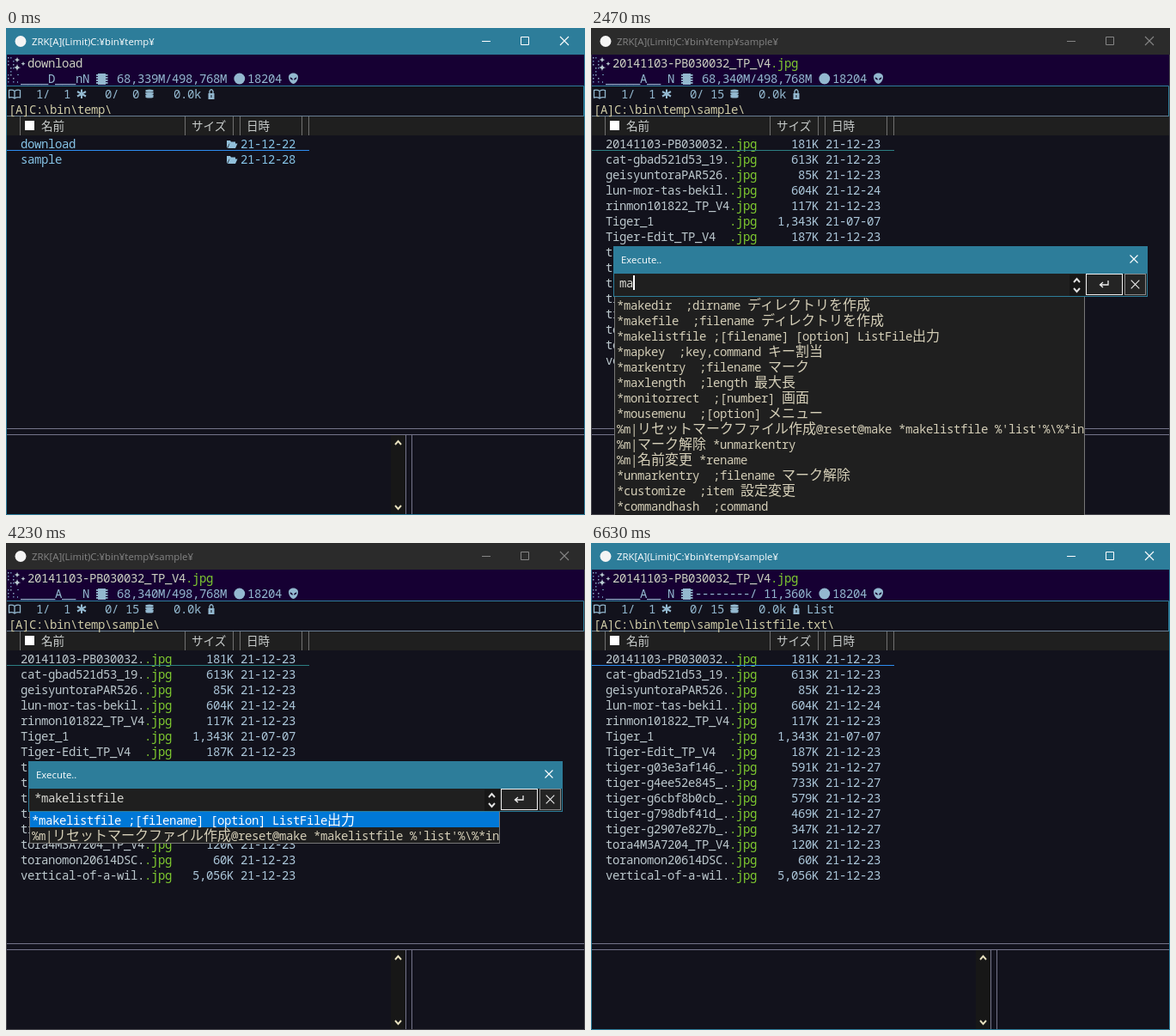
These frames come from a looping animation (674 px wide and 567 px high, 8 s). An HTML page:

```html
<!DOCTYPE html>
<html lang="ja">
<head>
<meta charset="utf-8">
<title>File list</title>
<style>
  html, body { margin: 0; width: 100%; height: 100%; overflow: hidden; background: #12121c; }
  svg { display: block; width: 674px; height: 567px; }
  text { font: 500 14px "Noto Sans Mono", "Noto Sans CJK JP", monospace; letter-spacing: -.4px; white-space: pre; }
  .ui { font: 11.4px "Open Sans", "Noto Sans", sans-serif; letter-spacing: 0; }
  .head { font: 13.6px "Noto Sans CJK JP", "Noto Sans CJK", sans-serif; letter-spacing: 0; }
  .wide { font: 16px "Noto Sans CJK JP", "Noto Sans CJK", sans-serif; letter-spacing: 0; }
</style>
</head>
<body>
<svg id="stage" viewBox="0 0 674 567"></svg>
<script>
const LOOP = 8000;
const TEAL = '#2d7d9a', INFO = '#93b8cf', NAME = '#bcc8cd', GREEN = '#80cc30', LINE = '#74748a', PANEL = '#1f1f1f';

const photos = [
  ['20141103-PB030032.', '181K', '12-23'],
  ['cat-gbad521d53_19.', '613K', '12-23'],
  ['geisyuntoraPAR526.', '85K', '12-23'],
  ['lun-mor-tas-bekil.', '604K', '12-24'],
  ['rinmon101822_TP_V4', '117K', '12-23'],
  ['Tiger_1', '1,343K', '07-07'],
  ['Tiger-Edit_TP_V4', '187K', '12-23'],
  ['tiger-g03e3af146_.', '591K', '12-27'],
  ['tiger-g4ee52e845_.', '733K', '12-27'],
  ['tiger-g6cbf8b0cb_.', '579K', '12-23'],
  ['tiger-g798dbf41d_.', '469K', '12-27'],
  ['tiger-g2907e827b_.', '347K', '12-27'],
  ['tora4M3A7204_TP_V4', '120K', '12-23'],
  ['toranomon20614DSC.', '60K', '12-23'],
  ['vertical-of-a-wil.', '5,056K', '12-23'],
].map(([name, size, day]) => ({ name, ext: '.jpg', size, date: '21-' + day }));
const folders = [['download', '22'], ['sample', '28']]
  .map(([name, day]) => ({ name, folder: true, date: '21-12-' + day }));
const listFile = { name: 'listfile', ext: '.txt', size: '7.1K', date: '21-12-28', marked: true };

const makeList = '*makelistfile ;[filename] [option] ListFile出力';
const makeMenu = "%m|リセットマークファイル作成@reset@make *makelistfile %'list'%\\%*in";
const makeItems = ['*makedir  ;dirname ディレクトリを作成', '*makefile  ;filename ディレクトリを作成', makeList, makeMenu];
const allItems = [...makeItems.slice(0, 3), '*mapkey  ;key,command キー割当', '*markentry  ;filename マーク',
  '*maxlength  ;length 最大長', '*monitorrect  ;[number] 画面', '*mousemenu  ;[option] メニュー', makeMenu,
  '%m|マーク解除 *unmarkentry', '%m|名前変更 *rename', '*unmarkentry  ;filename マーク解除',
  '*customize  ;item 設定変更', '*commandhash  ;command', '*closemenu'];

// Each step changes only the listed parts of the state before it.
const steps = [
  [0, { rows: folders, cursor: 0, attr: '____D___nN', disk: ' 68,339M/498,768M', total: ' 0', note: '', path: 'temp\\', title: 'temp¥' }],
  [500, { cursor: 1 }],
  [840, { rows: photos, cursor: 0, attr: '_____A__ N', disk: ' 68,340M/498,768M', total: '15', path: 'temp\\sample\\', title: 'temp¥sample¥' }],
  [1700, { dialog: true, typed: '', items: [] }],
  [2250, { typed: 'm' }],
  [2360, { items: allItems }],
  [2470, { typed: 'ma' }],
  [2710, { typed: 'mak', items: makeItems }],
  [2810, { typed: 'make' }],
  [3030, { typed: 'makel', items: [makeList, makeMenu] }],
  [3570, { picked: true }],
  [3700, { typed: '*makelistfile' }],
  [4230, { caretOff: true }],
  [4450, { dialog: false, rows: [...photos, listFile], disk: ' 68,342M/498,768M', total: '16' }],
  [5440, { attr: '_____A__ G' }],
  [6090, { cursor: 15 }],
  [6630, { cursor: 0, rows: photos, attr: '_____A__ N', disk: '--------/ 11,360k', total: '15', note: 'List', path: 'temp\\sample\\listfile.txt\\' }],
];
let merged = {};
const states = steps.map(([at, change]) => ({ at, ...(merged = { ...merged, ...change }) }));

const rect = (x, y, w, h, fill, extra = '') => `<rect x="${x}" y="${y}" width="${w}" height="${h}" fill="${fill}" ${extra}/>`;
const frame = (x, y, w, h, fill, stroke) => rect(x + .5, y + .5, w - 1, h - 1, fill, `stroke="${stroke}"`);
const text = (x, y, str, fill, extra = '') => `<text x="${x}" y="${y}" fill="${fill}" ${extra}>${str}</text>`;
const path = (d, stroke, width = 1) => `<path d="${d}" fill="none" stroke="${stroke}" stroke-width="${width}"/>`;
const solid = (d, fill) => `<path d="${d}" fill="${fill}"/>`;
const cross = (x, y, r, color) => path(`M${x - r} ${y - r}l${2 * r} ${2 * r}m0 ${-2 * r}l${-2 * r} ${2 * r}`, color, 1.1);
const chevron = (x, y, dir, color) => path(`M${x - 3.5} ${y + 2 * dir}l3.5 ${-4 * dir}l3.5 ${4 * dir}`, color, 1.9);
const mixed = str => str.replace(/[\u3040-\u30ff\u4e00-\u9fff]+/g, run => `<tspan class="wide">${run}</tspan>`);

function sparkles() {
  let out = '';
  for (let i = 0; i < 24; i++) {
    const x = 2 + (i % 3) * 3, y = 34 + Math.floor(i / 3) * 4;
    if ((i * 7) % 5 < 3) out += rect(x, y, 1.5, 1.5, i % 2 ? '#6688ad' : '#8ba8bd');
  }
  const star = (x, y, r) => solid(`M${x} ${y - r}q.5 ${r} ${r} ${r}q${-r} .5 ${-r} ${r}q-.5 ${-r} ${-r} ${-r}q${r} -.5 ${r} ${-r}`, '#b9ccd0');
  return out + star(13, 37, 3.5) + star(13, 46, 4.5) + star(20, 41.5, 2.5) + rect(13, 54, 2, 1, '#6688ad') + rect(13, 62, 1, 2, '#6688ad');
}

function infoIcons() {
  let out = rect(107, 53, 9, 13, INFO);
  for (let y = 54; y < 66; y += 3) out += rect(105, y, 13.5, 1.8, INFO);
  out += `<circle cx="271.8" cy="59" r="6.4" fill="${INFO}"/>`;
  out += solid('M329 57c0-6 11-6 11 0c0 4-3 8-5.5 8s-5.5-4-5.5-8', INFO);
  out += solid('M330.5 57.5q3 0 3.5 3q-3 0-3.5-3m8 0q-3 0-3.5 3q3 0 3.5-3', '#160033');
  out += path('M3.5 72.5q4-1 6.5 1q3-2 6.5-1v8.5q-3.5-1-6.5 1q-2.5-2-6.5-1zM10 73v9', INFO, 1.3);
  out += path('M88 71.5v10.5m-5-8l10 5.5m0-5.5l-10 5.5', INFO, 2);
  for (let y = 73; y < 83; y += 3.5) out += `<ellipse cx="167" cy="${y}" rx="4.7" ry="1.5" fill="${INFO}"/>`;
  out += rect(162.3, 74.6, 9.4, 1.2, INFO) + rect(162.3, 78, 9.4, 1.2, INFO);
  return out + rect(235.5, 76, 7, 7, INFO) + path('M237 76v-2.5q2-3.5 4 0v2.5', INFO, 1.3) + rect(238.5, 78, 1, 3, '#12121c');
}

function windowBase(s) {
  const active = !s.dialog;
  const ink = active ? '#fff' : '#858585';
  const edge = active ? TEAL : '#46464c';
  return rect(0, 0, 674, 567, '#12121c')
    + rect(0, 0, 674, 31, active ? TEAL : '#2b2b2b')
    + '<circle cx="17" cy="15.5" r="6.5" fill="#f4f4f4"/>'
    + text(30, 20, 'ZRK[A](Limit)C:¥bin¥' + s.title, ink, 'class="ui"')
    + path('M554 15.5h10M599.5 10.5h9v9h-9z', ink) + cross(650, 15, 5, ink)
    + rect(1, 31, 672, 36, '#160033')
    + rect(1, 103, 672, 22, PANEL)
    + path('M1 102.5H673', '#687e93') + path('M1 67.5H672.5V103', TEAL)
    + path('M16.5 103v22M208.5 103v22M264.5 103v22M272.5 103v22M344.5 103v22M352.5 103v22', '#707070')
    + rect(22, 108, 11, 11, '#fff')
    + [[41, '名前'], [216, 'サイズ'], [280, '日時']].map(([x, label]) => text(x, 119, label, '#c8cccb', 'class="head"')).join('')
    + rect(448, 474, 17, 92, '#171717')
    + path('M1 466.5H673M1 473.5H673M465.5 473V566M472.5 473V566', LINE)
    + chevron(456.5, 483, 1, '#e6dfbd') + chevron(456.5, 558, -1, '#e6dfbd')
    + path('M.5 31V566.5H673.5V31', edge);
}

function header(s) {
  const entry = s.rows[s.cursor];
  const full = entry.name === photos[0].name ? '20141103-PB030032_TP_V4' : entry.name;
  const ext = entry.ext ? `<tspan fill="${entry.marked ? '#5f93b5' : GREEN}">${entry.ext}</tspan>` : '';
  return sparkles() + infoIcons()
    + text(25, 46, full + ext, '#cbd0c0')
    + text(17, 64, s.attr, INFO) + text(121, 64, s.disk, INFO) + text(281, 64, '18204', INFO)
    + text(35, 82, '1/  1', INFO) + text(115, 82, '0/ ' + s.total, INFO) + text(195, 82, '0.0k', INFO)
    + text(251, 82, s.note, INFO)
    + text(3, 100, '[A]C:\\bin\\' + s.path, '#cdc9a5');
}

function fileRow(row, i) {
  const y = 140 + 18 * i;
  const ink = row.folder ? '#86c3e6' : NAME;
  let out = row.marked ? rect(1, y - 15, 352, 18, '#28326f') : '';
  out += text(17, y, row.name, ink) + text(273, y, row.date, row.folder ? ink : '#acc7da');
  if (row.folder) return out + solid(`M257 ${y}v-9h4l1 1.5h5v2h-7zM258 ${y}l2.5-5.5h9l-2.5 5.5z`, '#91bfda');
  return out + text(161, y, row.ext, row.marked ? '#5f93b5' : GREEN)
    + text(265, y, row.size, '#acc7da', 'text-anchor="end"');
}

function dialog(s) {
  let out = '';
  const n = s.items.length;
  if (n) {
    out += frame(27, 312, 548, 18 * n + 2, PANEL, '#777');
    if (s.picked) out += rect(28, 313, 546, 18, '#0078d7');
    out += '<g clip-path="url(#menu)">' + s.items.map((item, i) =>
      text(30, 328 + 18 * i, mixed(item), s.picked && !i ? '#fff' : '#d5cfb8')).join('') + '</g>';
  }
  out += frame(26, 254, 622, 59, PANEL, TEAL) + rect(26, 254, 622, 32, TEAL)
    + text(35, 274, 'Execute..', '#fff', 'class="ui"') + cross(632, 269, 4.5, '#fff')
    + rect(557, 287, 17, 25, '#171717')
    + chevron(565.5, 294, 1, '#e2e2e2') + chevron(565.5, 305, -1, '#e2e2e2')
    + frame(576, 286, 43, 25, '#242424', '#f2f2f2') + frame(621, 286, 25, 25, '#242424', '#8c8c8c')
    + path('M602 294v5h-9m3-3l-3.5 3l3.5 3', '#eee', 1.3) + cross(633.5, 298.5, 4.8, '#eee')
    + text(33, 302, s.typed, '#d8d8d2');
  if (!s.caretOff) out += rect(33 + 8 * s.typed.length, 288, 2, 17, '#fff');
  return out;
}

const stage = document.getElementById('stage');
let shown = null;

function draw(time) {
  const s = states.findLast(state => state.at <= time);
  if (s === shown) return;
  shown = s;
  stage.innerHTML = '<clipPath id="menu"><rect x="28" y="313" width="546" height="254"/></clipPath>'
    + windowBase(s) + header(s) + s.rows.map(fileRow).join('')
    + rect(1, 142 + 18 * s.cursor, 352, 1, s.dialog ? '#2c7f83' : '#2d8cf0')
    + (s.dialog ? dialog(s) : '');
}

const start = performance.now();
function tick() {
  draw((performance.now() - start) % LOOP);
  requestAnimationFrame(tick);
}
tick();
</script>
</body>
</html>
```
